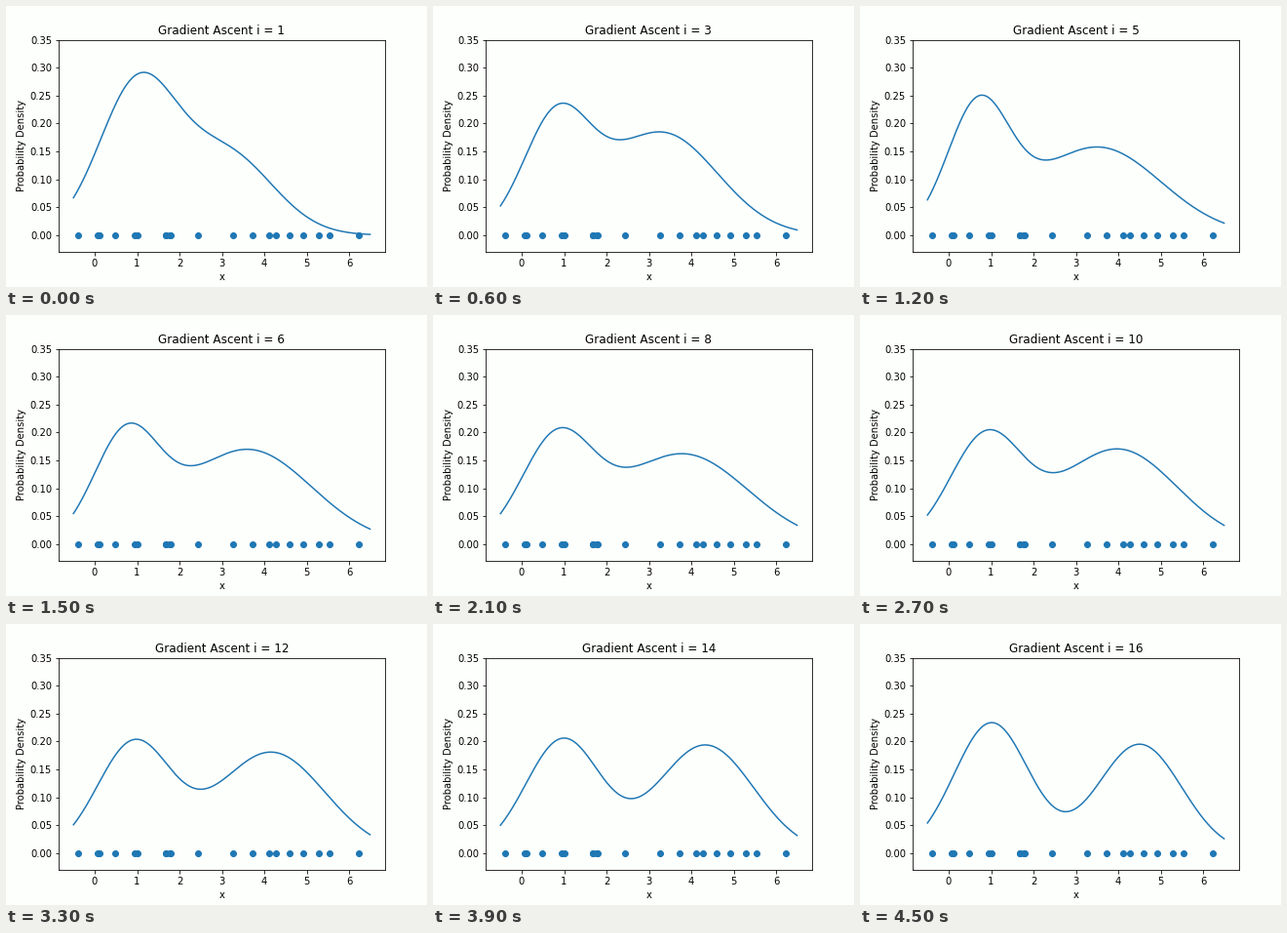
Animation of 432 by 288 pixels, one loop 4.8 s. Source, as a matplotlib script:

```python
import numpy as np
import matplotlib.pyplot as plt
from matplotlib.animation import FuncAnimation

BG = "#fdfffc"
BLUE = "#1f77b4"
STEPS = 16

samples = [-0.39, 0.06, 0.12, 0.48, 0.94, 1.01, 1.67, 1.68, 1.76, 1.80,
           2.44, 3.25, 3.72, 4.12, 4.28, 4.60, 4.92, 5.28, 5.53, 6.22]

x = np.arange(-0.5, 6.5, 0.01)


def ease(step, *values):
    """Value at a step, running through a few key steps."""
    return np.interp(step, [1, 3, 5, 8, 14, 16], values)


def normal(mean, sigma):
    return np.exp(-0.5 * ((x - mean) / sigma) ** 2) / (sigma * np.sqrt(2 * np.pi))


def density(step):
    u = (step - 1) / (STEPS - 1)
    left = normal(ease(step, 1.005, 0.818, 0.695, 0.83, 0.975, 1.01),
                  ease(step, 0.904, 0.786, 0.733, 0.837, 0.88, 0.882))
    right = normal(3.1 + 1.4 * u + 0.04 * np.sin(np.pi * u),
                   ease(step, 1.1, 1.305, 1.497, 1.525, 1.135, 0.99))
    # the mixing weight overshoots to alternate sides
    w = ease(step, 0.43, 0.63, 0.622, 0.588, 0.521, 0.454) + 0.03 * (-1) ** step
    return (1 - w) * left + w * right


plt.rcParams["font.family"] = "DejaVu Sans"
plt.rcParams["font.size"] = 10

fig, ax = plt.subplots(figsize=(6, 4), dpi=72, facecolor=BG)
fig.subplots_adjust(left=0.125, right=0.9, bottom=0.125, top=0.88)
ax.set_facecolor(BG)
ax.scatter(samples, np.zeros(len(samples)), color=BLUE)
curve, = ax.plot(x, density(1), color=BLUE)
span = x[-1] - x[0]
ax.set_xlim(x[0] - 0.05 * span, x[-1] + 0.05 * span)
ax.set_ylim(-0.03, 0.35)
ax.set_xticks(range(7))
ax.set_yticks(np.arange(8) * 0.05)
ax.set_xlabel("x")
ax.set_ylabel("Probability Density")
title = ax.set_title("Gradient Ascent i = 1")


def draw(frame):
    step = frame + 1
    curve.set_ydata(density(step))
    title.set_text(f"Gradient Ascent i = {step}")
    return curve, title


anim = FuncAnimation(fig, draw, frames=STEPS, init_func=lambda: draw(0),
                     interval=300, repeat=True, repeat_delay=0, blit=False)
plt.show()
```
